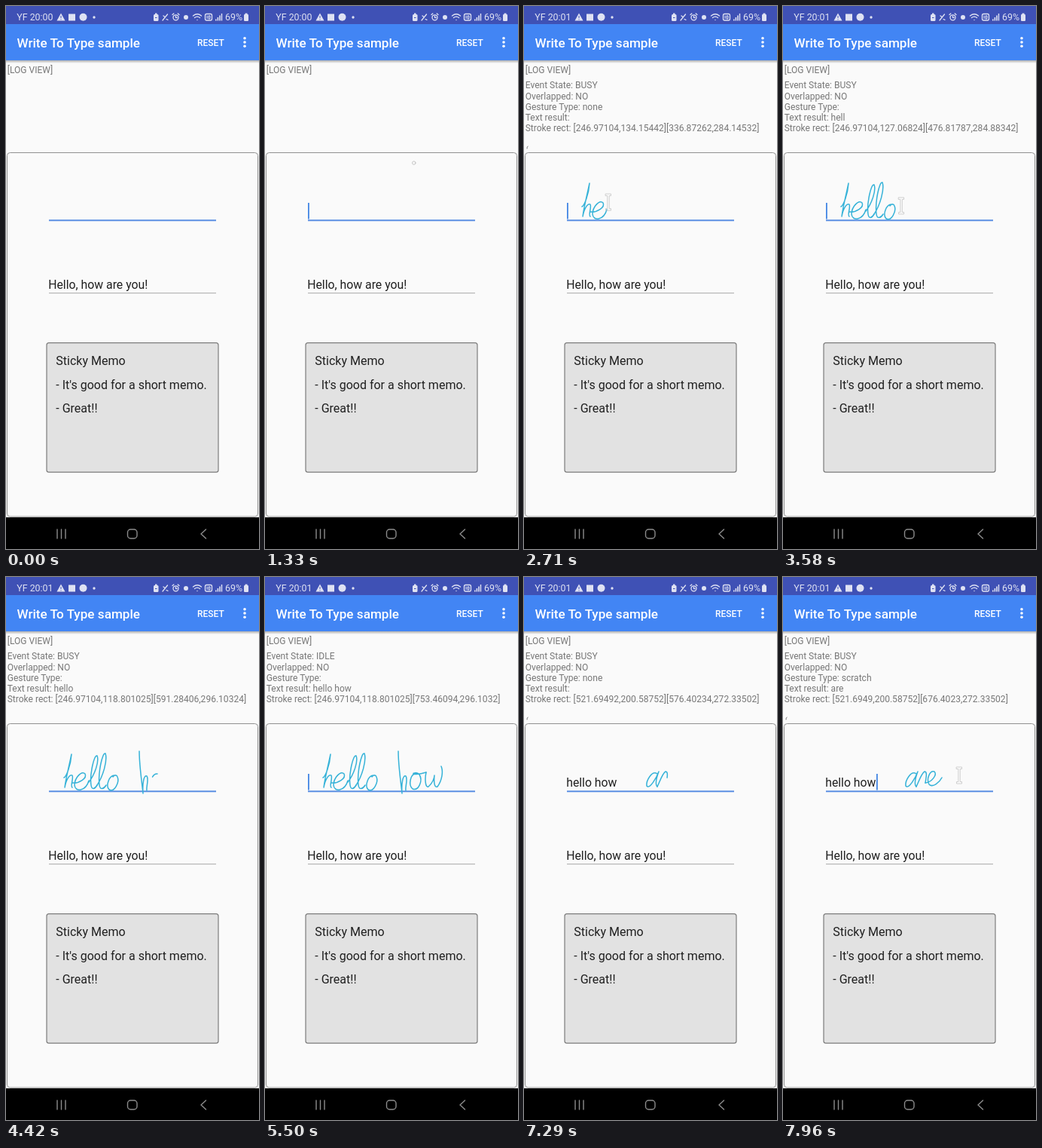
An HTML page for the animation above (8 s loop, 336 by 720 pixels).

```html
<!DOCTYPE html>
<html lang="en">
<head>
<meta charset="utf-8">
<title>Write To Type sample</title>
<style>
  html, body { margin: 0; width: 100%; height: 100%; overflow: hidden; background: #fafafa; }
  svg { display: block; width: 336px; height: 720px; font-family: Roboto, sans-serif; }
  text { white-space: pre; }
  .status { font-size: 12.4px; fill: #dfe2f3; }
  .log { font-size: 12.05px; fill: #777; }
  .field { font-size: 15.8px; fill: #202020; }
  .memo { font-size: 16px; fill: #202020; }
  .bar { font-weight: 500; fill: #fff; }
  .line { fill: none; stroke-linecap: round; stroke-linejoin: round; }
</style>
</head>
<body>
<svg viewBox="0 0 336 720">
  <defs>
    <linearGradient id="shade" x2="0" y2="1">
      <stop stop-color="#000" stop-opacity=".3"/>
      <stop offset="1" stop-color="#000" stop-opacity="0"/>
    </linearGradient>
  </defs>
  <rect width="336" height="720" fill="#fafafa"/>

  <!-- status bar -->
  <rect width="336" height="24" fill="#3f51b5"/>
  <text id="clock" class="status" x="14.3" y="19.3"></text>
  <g fill="#dfe2f3">
    <path d="M73 9.5L78.5 19.5H67.5Z"/>
    <path d="M73 13v3M73 17.3v1" stroke="#3f51b5"/>
    <rect x="83" y="10.5" width="9" height="9"/>
    <circle cx="102.5" cy="14.8" r="5"/>
    <circle cx="117" cy="15" r="1.7"/>
    <rect x="196" y="11" width="6.5" height="9" rx="1.5"/>
    <rect x="198" y="9.5" width="2.5" height="2"/>
    <path d="M198 15.5h2.5" stroke="#3f51b5"/>
    <circle cx="239" cy="15" r="3"/>
    <path d="M278 19.5v-2h1.6v2zM280.6 19.5v-4.5h1.6v4.5zM283.2 19.5v-7h1.6v7zM285.8 19.5v-9.5h1.4v9.5z"/>
    <rect x="316" y="11" width="6" height="9" rx="1.2"/>
    <rect x="317.5" y="9.6" width="3" height="2"/>
  </g>
  <g class="line" stroke="#dfe2f3" stroke-width="1.3">
    <path d="M208 19l6.5-8M209 13l2 1.5M213 17.5l2 .8"/>
    <circle cx="225.5" cy="15.3" r="3.5"/>
    <path d="M225.5 13.3v2.2h1.6M221 11.5l1.8-1.6M230 11.5l-1.8-1.6"/>
    <path d="M248.5 13q5.5-4.5 11 0M250.5 15.5q3.5-2.8 7 0M254 18.5v.1"/>
    <rect x="264.5" y="10.5" width="9" height="8.5" rx="2"/>
    <path d="M267 13v3.5M269 16.5v-3.5h2v3.5z" stroke-width="1"/>
  </g>
  <text class="status" x="291" y="19.3">69%</text>

  <!-- app bar -->
  <rect y="72" width="336" height="4" fill="url(#shade)"/>
  <rect y="24" width="336" height="48" fill="#4285f4"/>
  <text class="bar" x="14.5" y="54.5" font-size="17.14">Write To Type sample</text>
  <text class="bar" x="254" y="52.5" font-size="12">RESET</text>
  <g fill="#fff">
    <circle cx="317" cy="42.8" r="1.8"/>
    <circle cx="317" cy="48" r="1.8"/>
    <circle cx="317" cy="53.2" r="1.8"/>
  </g>

  <g id="log" class="log"></g>
  <path id="clip" class="line" d="M5 186q-1.2 1-1 3" stroke="#777"/>

  <!-- page -->
  <rect x="1.5" y="194.5" width="333" height="482.5" rx="4" fill="#fafafa" stroke="#909090"/>
  <path d="M57 284.3H279" stroke="#5b8fe2" stroke-width="2"/>
  <path d="M57 380.7H279" stroke="#a8a8a8"/>
  <text id="typed" class="field" x="56.2" y="277.5"></text>
  <text class="field" x="56.2" y="374.7">Hello, how are you!</text>
  <rect x="54" y="446.7" width="228" height="171.5" rx="3" fill="#e2e2e2" stroke="#7c7c7c" stroke-width="1.2"/>
  <g class="memo">
    <text x="66.3" y="476">Sticky Memo</text>
    <text x="66.3" y="507.5">- It's good for a short memo.</text>
    <text x="66.3" y="539">- Great!!</text>
  </g>

  <rect id="caret" y="261" width="1.8" height="21.5" fill="#4285e4"/>
  <g id="ink" class="line" stroke="#35b2d8" stroke-width="1.5"></g>
  <g id="pen" class="line" stroke="#c4c4c4">
    <circle id="dot" r="2.2"/>
    <path id="beam" stroke-width=".8" d="M-3.5-11h7v2.5h-2.3v17h2.3v2.5h-7v-2.5h2.3v-17h-2.3z"/>
  </g>

  <!-- navigation bar -->
  <rect y="678" width="336" height="42"/>
  <g class="line" stroke="#8c8c8c" stroke-width="1.4">
    <path d="M68 694v12M73.5 694v12M79 694v12"/>
    <rect x="161.5" y="694" width="12.5" height="12" rx="4"/>
    <path d="M265.5 694l-6.5 6 6.5 6"/>
  </g>
</svg>
<script>
const LOOP = 8000, COMMIT = 5900;
const $ = id => document.getElementById(id);
const show = (el, on) => el.setAttribute('visibility', on ? 'visible' : 'hidden');
const svg = (tag, attrs, parent) => {
  const el = document.createElementNS('http://www.w3.org/2000/svg', tag);
  for (const k in attrs) el.setAttribute(k, attrs[k]);
  return parent.appendChild(el);
};

// pen strokes: start, end, path
const strokes = [
  [2000, 2320, 'M77 266C80 265 86 250 87 235C84 250 80 264 78 279C80 268 85 261 88 263C90 267 85 278 88 279'],
  [2340, 2640, 'M88 273C97 274 108 267 105 261C101 256 91 266 91 276C92 286 106 284 110 270'],
  [2800, 3030, 'M110 272C118 262 124 244 121 237C117 235 111 262 113 276C114 283 118 281 121 276'],
  [3030, 3250, 'M121 276C129 264 135 243 132 234C128 232 122 260 124 276C125 283 130 281 133 276'],
  [3260, 3470, 'M145 263C137 262 132 277 137 282C144 286 151 272 148 265C147 262 144 262 142 265'],
  [3950, 4290, 'M177 231C177 250 180 268 182 287C181 274 183 262 187 264C190 268 186 278 187 283'],
  [4390, 4680, 'M201 261C193 260 190 276 196 281C204 284 210 270 205 262C202 258 196 260 197 261C202 262 208 261 214 259'],
  [4690, 5000, 'M214 259C212 268 213 280 217 278C222 274 225 267 225 263C224 272 225 280 229 278C235 270 237 258 234 251'],
  [6850, 7090, 'M177 261C170 256 162 270 163 277C167 282 176 266 179 258C176 266 174 275 177 278'],
  [7100, 7330, 'M177 278C180 272 184 260 188 258C192 258 190 266 189 273'],
  [7330, 7620, 'M189 273C198 272 205 262 201 258C195 256 190 268 194 275C199 280 208 272 211 266']
].map(([from, to, d]) => ({ from, to, el: svg('path', { d, pathLength: 1 }, $('ink')) }));

// hovering pen: runs of [time, x, y]
const hovers = [
  [[1170, 230, 198], [1330, 198, 208], [1650, 130, 232], [2000, 77, 266]],
  [[2640, 110, 268], [2710, 112, 260], [2800, 110, 270]],
  [[3470, 148, 266], [3580, 157, 265], [3800, 176, 250], [3950, 177, 231]],
  [[4290, 187, 283], [4390, 201, 261]],
  [[5000, 234, 251], [5100, 243, 256], [5220, 250, 262]],
  [[5540, 257, 262], [6250, 215, 275], [6500, 185, 302], [6750, 171, 267], [6850, 177, 261]],
  [[7620, 211, 266], [7800, 224, 262], [7960, 234, 263], [8000, 235, 263]]
];

// log states: start, event, gesture, result, rect, clipped last line
const first = '[246.97104,134.15442][336.87262,284.14532]';
const hello = '[246.97104,127.06824][476.81787,284.88342]';
const tall = '[246.97104,118.801025][591.28406,296.10324]';
const full = '[246.97104,118.801025][753.46094,296.1032]';
const states = [
  [2340, 'BUSY', 'none', '', first, true],
  [2950, 'BUSY', '', 'he', first],
  [3250, 'BUSY', '', 'hell', '[246.97104,127.06824][430.15283,284.88342]'],
  [3500, 'BUSY', '', 'hell', hello],
  [3800, 'IDLE', '', 'hello', hello],
  [4300, 'BUSY', '', 'hello', tall],
  [5020, 'BUSY', '', 'hello h', full],
  [5180, 'IDLE', '', 'hello how', full],
  [COMMIT, 'COMMITTED', '', 'hello how', full],
  [7100, 'BUSY', 'none', '', '[521.69492,200.58752][576.40234,272.33502]', true],
  [7660, 'BUSY', 'scratch', 'are', '[521.6949,200.58752][676.4023,272.33502]', true]
];

const rows = [89, 109.3, 123.5, 137.7, 152, 166.2].map(y => svg('text', { x: 1.7, y }, $('log')));

function drawLog(t) {
  const s = states.findLast(s => t >= s[0]);
  const lines = ['[LOG VIEW]'];
  if (s) lines.push('Event State: ' + s[1], 'Overlapped: NO', 'Gesture Type: ' + s[2],
    'Text result: ' + s[3], 'Stroke rect: ' + s[4]);
  rows.forEach((row, i) => row.textContent = lines[i] || '');
  show($('clip'), s && s[5]);
}

function drawInk(t) {
  for (const { from, to, el } of strokes) {
    const part = Math.min(1, (t - from) / (to - from));
    show(el, part > 0 && (t < COMMIT || from > COMMIT));
    el.setAttribute('stroke-dasharray', part < 1 ? `${Math.max(0, part)} 2` : 'none');
  }
}

function drawPen(t) {
  const run = hovers.find(h => t >= h[0][0] && t < h.at(-1)[0]);
  show($('dot'), false);
  show($('beam'), false);
  if (!run) return;
  const i = run.findIndex(k => k[0] > t), a = run[i - 1], b = run[i];
  const mix = n => a[n] + (b[n] - a[n]) * (t - a[0]) / (b[0] - a[0]);
  const y = mix(2), inField = y > 240 && y < 296;
  $('pen').setAttribute('transform', `translate(${mix(1)} ${y})`);
  show($(inField ? 'beam' : 'dot'), true);
}

function frame() {
  const t = performance.now() % LOOP;
  $('clock').textContent = t < 2300 ? 'YF 20:00' : 'YF 20:01';
  $('typed').textContent = t < COMMIT ? '' : 'hello how';
  $('caret').setAttribute('x', t < COMMIT ? 57 : 124);
  // the blink restarts when the pen touches the field
  show($('caret'), t < 2000 ? (t + 830) % 1000 < 500 : t % 1000 >= 500);
  drawLog(t);
  drawInk(t);
  drawPen(t);
  requestAnimationFrame(frame);
}
frame();
</script>
</body>
</html>
```
